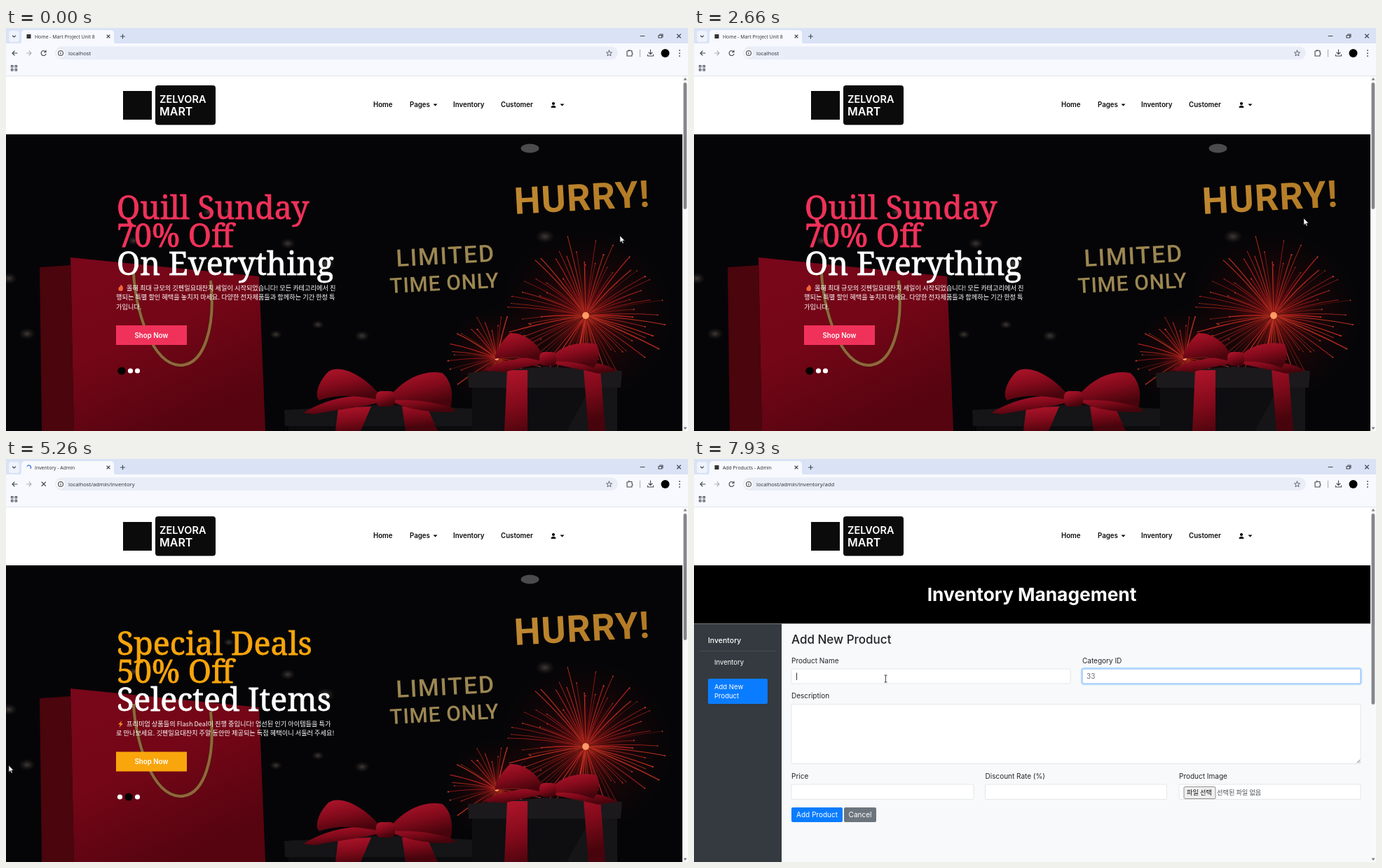
These frames come from a looping animation (973 by 576 pixels, 8 s). An HTML page:

```html
<!DOCTYPE html>
<html lang="en">
<head>
<meta charset="utf-8">
<title>Shop demo</title>
<style>
html,body{margin:0;width:100%;height:100%;overflow:hidden;background:#fff}
svg{display:block;width:100vw;height:100vh}
text{font-family:Inter,sans-serif;white-space:pre}
.ui{font:7.7px "Open Sans",sans-serif;fill:#2b2d33}
.nav{font-size:9.7px;font-weight:600;fill:#0b0b0b}
.head{font:500 44.8px "Noto Serif",serif;stroke-width:.8}
.ko{font:500 9.2px "Noto Sans CJK KR","Noto Sans CJK",sans-serif;fill:#fff}
.sign{font-family:Roboto,sans-serif;font-weight:700}
.thin{font-weight:500}
.label{font-size:10px;fill:#212529}
.side{font-size:9.5px;fill:#fff}
.line{fill:none;stroke:#43474e;stroke-width:1.1;stroke-linecap:round;stroke-linejoin:round}
.field{fill:#fff;stroke:#dde1e5;stroke-width:.8}
</style>
</head>
<body>
<svg viewBox="0 0 973 576" preserveAspectRatio="none">
<defs>
  <linearGradient id="bag" x2=".5" y2="1"><stop stop-color="#78071a"/><stop offset=".5" stop-color="#740617"/><stop offset="1" stop-color="#560410"/></linearGradient>
  <linearGradient id="silk" x2=".4" y2="1"><stop stop-color="#b3152c"/><stop offset=".55" stop-color="#820a1b"/><stop offset="1" stop-color="#48040c"/></linearGradient>
  <linearGradient id="gold" x2="1" y2=".3"><stop stop-color="#c18a33"/><stop offset="1" stop-color="#b27a25"/></linearGradient>
  <radialGradient id="glow"><stop stop-color="#ff5038" stop-opacity=".8"/><stop offset=".15" stop-color="#a81016" stop-opacity=".5"/><stop offset=".5" stop-color="#60080c" stop-opacity=".22"/><stop offset="1" stop-color="#400406" stop-opacity="0"/></radialGradient>
  <radialGradient id="blur"><stop stop-color="#75665a" stop-opacity=".55"/><stop offset="1" stop-color="#333" stop-opacity="0"/></radialGradient>
  <clipPath id="page"><path d="M0 152H965V576H0z"/></clipPath>
</defs>

<rect width="973" height="576" fill="#fff"/>

<g id="home" clip-path="url(#page)">
  <rect y="152" width="965" height="424" fill="#050507"/>
  <g id="lights"></g>
  <ellipse cx="747.5" cy="172" rx="13" ry="6.5" fill="#4b4b4d"/>
  <path d="M48 342L92 339 97 576H51z" fill="#4a050d"/>
  <path d="M92 328L361 355 370 576H97z" fill="url(#bag)"/>
  <g fill="none">
    <path d="M182 350C184 400 207 480 248 482 284 482 299 425 292 361" stroke="#3c1f10" stroke-width="5.5"/>
    <path d="M182 350C184 400 207 480 248 482 284 482 299 425 292 361" stroke="#94663c" stroke-width="4"/>
  </g>
  <g id="fireworks" fill="none" stroke-linecap="round"></g>

  <path d="M397 546L540 538 684 545 682 569 398 569z" fill="#151417"/>
  <path d="M403 569H678V576H403z" fill="#0b0b0d"/>
  <g fill="url(#silk)">
    <path d="M474 543L521 541 506 576H470zM565 541L600 540 616 576H570z"/>
    <path d="M532 528C500 522 462 527 424 550L440 552C475 545 510 542 533 535z"/>
    <path d="M551 527C590 517 622 528 642 548L620 549C594 548 570 543 552 535z"/>
    <path d="M535 526C510 496 478 480 460 491 444 507 440 527 447 532 475 522 506 526 535 532z"/>
    <path d="M548 526C567 502 596 488 622 493 638 504 638 532 634 542 602 532 576 531 549 532z"/>
    <rect x="528" y="519" width="27" height="22" rx="7"/>
  </g>

  <path d="M659 493L770 484 879 490 877 514 660 514z" fill="#1b191c"/>
  <path d="M665 514H872V576H665z" fill="#0e0d10"/>
  <path d="M800 576L834 514H872V576z" fill="#151417"/>
  <g fill="url(#silk)">
    <path d="M715 489H744V576H711zM824 487L848 487 855 576H831z"/>
    <path d="M765 470C735 469 700 478 681 489L710 492C735 485 755 482 768 479z"/>
    <path d="M779 470C810 474 850 476 873 490L845 494C822 488 795 484 778 479z"/>
    <path d="M766 469C758 448 737 435 719 436 707 447 698 464 697 473 722 468 745 470 766 477z"/>
    <path d="M780 468C795 453 820 447 843 452 849 466 844 480 838 486 818 477 799 476 780 477z"/>
    <rect x="761" y="463" width="24" height="20" rx="7"/>
  </g>
  <text class="sign" transform="translate(726 266)rotate(-3.2)" font-size="53" letter-spacing="1.4" fill="url(#gold)">HURRY!</text>
  <g fill="#9c8753">
    <text class="sign thin" transform="translate(557 341)rotate(-3)" font-size="34" letter-spacing="1.8">LIMITED</text>
    <text class="sign thin" transform="translate(548 379)rotate(-3)" font-size="30" letter-spacing=".7">TIME ONLY</text>
  </g>

  <g id="slide1">
    <g fill="#f0325a" stroke="#f0325a"><text class="head" x="158" y="273">Quill Sunday</text><text class="head" x="158" y="313">70% Off</text></g>
    <text class="head" x="158" y="352.5" fill="#fff" stroke="#fff">On Everything</text>
    <path d="M164 367C168 369 168 376 164 376 159 376 160 371 162 370z" fill="#f4633a"/>
    <text class="ko" x="172" y="374.5">올해 최대 규모의 깃펜일요대잔치 세일이 시작되었습니다! 모든 카테고리에서 진</text>
    <text class="ko" x="157" y="388">행되는 특별 할인 혜택을 놓치지 마세요. 다양한 전자제품들과 함께하는 기간 한정 특</text>
    <text class="ko" x="157" y="401.5">가입니다.</text>
    <rect x="157" y="425" width="101" height="28" fill="#f0325a"/>
    <text class="nav" x="207.5" y="442.5" text-anchor="middle" style="fill:#fff">Shop Now</text>
  </g>
  <g id="slide2">
    <g fill="#f9a50c" stroke="#f9a50c"><text class="head" x="158" y="273">Special Deals</text><text class="head" x="158" y="313">50% Off</text></g>
    <text class="head" x="158" y="352.5" fill="#fff" stroke="#fff">Selected Items</text>
    <path d="M165 367L160 372.500H163L161.500 377 167 371H164z" fill="#f5852a"/>
    <text class="ko" x="172" y="374.5">프리미엄 상품들의 Flash Deal이 진행 중입니다! 엄선된 인기 아이템들을 특가</text>
    <text class="ko" x="157" y="388">로 만나보세요. 깃펜일요대잔치 주말 동안만 제공되는 독점 혜택이니 서둘러 주세요!</text>
    <rect x="157" y="411.5" width="101" height="28" fill="#f9a50c"/>
    <text class="nav" x="207.5" y="429" text-anchor="middle" style="fill:#fff">Shop Now</text>
  </g>
  <g id="dots"><circle cy="490"/><circle cy="490"/><circle cy="490"/></g>
</g>

<g id="admin">
  <rect y="152" width="965" height="83.500" fill="#000"/>
  <text x="482" y="203" font-size="26.300" font-weight="700" fill="#fff" text-anchor="middle">Inventory Management</text>
  <rect y="235.500" width="965" height="341" fill="#f8f9fa"/>
  <rect y="235.500" width="125" height="341" fill="#343a40"/>
  <text x="20" y="262.500" font-size="10.500" font-weight="500" fill="#fff">Inventory</text>
  <path d="M8 274.500H117" stroke="#464c52"/>
  <rect id="active" x="20" width="85" rx="2" fill="#0a7cff"/>
  <text class="side" x="29" y="294">Inventory</text>
  <text class="side" x="29" y="328.500">Add New</text><text class="side" x="29" y="342">Product</text>
  <g id="form">
    <text x="139" y="264" font-size="17" font-weight="500" fill="#212529">Add New Product</text>
    <g id="fields"></g>
    <path d="M946 434L950 430M948.500 434L950 432.500" class="line" style="stroke-width:.7"/>
    <rect x="699" y="468.500" width="45" height="17" rx="1.500" fill="#efefef" stroke="#777" stroke-width=".8"/>
    <text class="ko" x="703" y="480" style="fill:#111">파일 선택</text>
    <text class="ko" x="746" y="480" style="fill:#495057;font-weight:400">선택된 파일 없음</text>
    <rect x="139" y="498" width="73" height="21" rx="2" fill="#0a7cff"/>
    <text class="label" x="175.500" y="511.500" text-anchor="middle" style="fill:#fff">Add Product</text>
    <rect x="214" y="498" width="46" height="21" rx="2" fill="#6c757d"/>
    <text class="label" x="237" y="511.500" text-anchor="middle" style="fill:#fff">Cancel</text>
    <g id="ring" fill="none"><rect x="553" y="299" width="399" height="23" rx="3" stroke="#bfdeff" stroke-width="2.400"/><rect x="554" y="300" width="397" height="21" rx="2" stroke="#80bdff" stroke-width=".8"/></g>
    <text id="category" class="label" x="560" y="314" style="fill:#6a7076"></text>
    <path id="caret" stroke="#222" stroke-width=".9"/>
  </g>
</g>

<g id="siteHeader">
  <rect x="167" y="90" width="41" height="41" fill="#0b0b0c"/>
  <rect x="213" y="82" width="86" height="56.500" rx="4" fill="#0b0b0c"/>
  <g fill="#fff" font-size="16" font-weight="600"><text x="219" y="107" font-size="14.500">ZELVORA</text><text x="219" y="124.500">MART</text></g>
  <text class="nav" x="524" y="113">Home</text><text class="nav" x="576" y="113">Pages</text>
  <text class="nav" x="638" y="113">Inventory</text><text class="nav" x="706" y="113">Customer</text>
  <path d="M609.500 108.500H615.500L612.500 111.500zM790.500 108.500H796.500L793.500 111.500zM777.500 114C777.500 109.500 784.500 109.500 784.500 114z"/>
  <circle cx="781" cy="108" r="2.100"/>
</g>

<rect width="973" height="23" fill="#dae2f6"/>
<rect y="22" width="973" height="46" fill="#f7f9fe"/>
<path d="M0 68.500H973" stroke="#dfe3ec"/>
<rect x="4" y="4" width="15" height="16" rx="4" fill="#edf2fc"/>
<path d="M18 23Q22 23 22 18V8Q22 3 27 3H149Q154 3 154 8V18Q154 23 158 23z" fill="#f7f9fe"/>
<path class="line" d="M9.500 11L11.500 13 13.500 11M144 10L148 14M148 10L144 14M166.500 9V15M163.500 12H169.500M905 11.500H911M957.500 9L962.500 14M962.500 9L957.500 14M931 10.500H935.500V14H931zM932.500 9H937V13M16 36H9.500M12 33L9 36 12 39M886 33H888Q888 30.500 890 32.500H893V35.500Q895 36 893 38V40H886zM919.500 31V37M917 35L919.500 37.500 922 35M915.500 38V40H923.500V38"/>
<path class="line" style="stroke:#aab0bb" d="M29.500 36H36M33 33L36 36 33 39M904.500 31V41"/>
<path id="reload" class="line" d="M56.500 34A3.500 3.500 0 1 0 57 37M57 32V34.500H54.500"/>
<path id="stop" class="line" d="M51 33L56.500 38.500M56.500 33L51 38.500"/>
<rect x="70" y="26.500" width="803" height="18.500" rx="9.250" fill="#e9edf7"/>
<circle cx="78" cy="36" r="6" fill="#fff"/>
<circle class="line" cx="78" cy="36" r="3.500"/><path class="line" d="M78 35.500V37.500M78 34V34"/>
<path class="line" style="stroke-width:.8" d="M860.500 32L861.700 34.800 864.500 35 862.300 36.800 863 39.700 860.500 38.200 858 39.700 858.700 36.800 856.500 35 859.300 34.800z"/>
<circle cx="940.500" cy="36" r="6" fill="#000"/>
<path d="M961 32V32M961 36V36M961 40V40" stroke="#43474e" stroke-width="1.800" stroke-linecap="round"/>
<path class="line" d="M7.500 53.500H10V56H7.500zM13 53.500H15.500V56H13zM7.500 58.500H10V61H7.500zM13 58.500H15.500V61H13z"/>
<rect id="favicon" x="29.500" y="9" width="6" height="6" fill="#333"/>
<path id="spinner" class="line" d="M32.500 9A3 3 0 0 1 32.500 15" style="stroke:#3568d4"/>
<text id="title" class="ui" x="41" y="15" style="font-size:6.900px"></text>
<text id="url" class="ui" x="89" y="38.500"></text>

<rect x="965" y="69" width="8" height="507" fill="#fafafb"/>
<path d="M966.500 74.500L969 71 971.500 74.500zM966.500 570.500L969 574 971.500 570.500z" fill="#77797d"/>
<rect id="thumb" x="966.500" y="78" width="4.800" rx="2.400" fill="#858689"/>

<g id="pointer" stroke-linejoin="round">
  <path id="arrow" d="M0 0V9.500L2.200 7.500 3.700 11 5.200 10.400 3.700 7H6.700z" fill="#fff" stroke="#222" stroke-width=".6"/>
  <path id="hand" d="M0 0Q1.500 -1 1.700 1V4L6 5V8L5 11H0L-3 7Q-3 5 -1 7V1Z" fill="#fff" stroke="#222" stroke-width=".7"/>
  <path id="beam" d="M-2-5H2M0-5V5M-2 5H2" fill="none" stroke="#333" stroke-width=".9"/>
</g>
</svg>
<script>
const $ = id => document.getElementById(id);
const show = (id, on) => $(id).style.display = on ? '' : 'none';
const move = (id, x, y) => $(id).setAttribute('transform', `translate(${x} ${y})`);
const LOOP = 8000, SLIDE_START = 3026, SLIDE_TIME = 600, PAGE_WIDTH = 965;
const OPEN_INVENTORY = 4730, PAINT_INVENTORY = 5330, PAINT_FORM = 5980;

let seed = 7;
const random = () => (seed = seed * 16807 % 2147483647) / 2147483647;

function burst(cx, cy, reach, count) {
  let out = `<circle cx="${cx}" cy="${cy}" r="${reach}" fill="url(#glow)"/>`;
  for (let i = 0; i < count; i++) {
    const a = (i + random()) / count * 2 * Math.PI, r = reach * (.5 + .5 * random());
    const x = cx + Math.cos(a) * r, y = cy + Math.sin(a) * r * .95;
    const mx = cx + Math.cos(a) * r * .55, my = cy + Math.sin(a) * r * .55 - r * .04;
    out += `<path d="M${cx} ${cy}Q${mx} ${my} ${x} ${y}" stroke="hsl(${random() * 8},72%,${22 + random() * 24}%)" stroke-width="${.5 + random() * .9}"/>
      <circle cx="${x}" cy="${y}" r="${.5 + random() * .7}" fill="#b8382c"/>`;
  }
  return out + `<circle cx="${cx}" cy="${cy}" r="${reach * .04}" fill="#ff9a66"/>`;
}
$('fireworks').innerHTML = burst(700, 472, 72, 42) + burst(827, 411, 123, 75);

$('lights').innerHTML = [[289, 263, 9], [318, 262, 8], [456, 337, 14], [402, 308, 11], [445, 424, 9],
  [508, 440, 11], [769, 298, 14], [182, 304, 9], [4, 358, 12], [385, 438, 9], [30, 437, 12]]
  .map(([x, y, r]) => `<ellipse cx="${x}" cy="${y}" rx="${r}" ry="${r * .7}" fill="url(#blur)"/>`).join('');

$('fields').innerHTML = [['Product Name', 139, 300, 398, 21], ['Category ID', 554, 300, 397, 21],
  ['Description', 139, 350.5, 812, 85], ['Price', 139, 465, 260, 21.5],
  ['Discount Rate (%)', 415.5, 465, 259, 21.5], ['Product Image', 692, 465, 259, 21.5]]
  .map(([name, x, y, w, h]) => `<text class="label" x="${x}" y="${y - 8.5}">${name}</text>
    <rect class="field" x="${x}" y="${y}" width="${w}" height="${h}" rx="2"/>`).join('');

const path = [[0, 876, 297], [860, 883, 291], [1460, 883, 291], [1930, 870, 272], [2960, 870, 272],
  [3260, 766, 151], [3780, 785, 96], [3930, 785, 96], [4330, 662, 110], [4660, 662, 110], [5260, 4, 438],
  [5400, 4, 438], [5700, 62, 332], [5950, 62, 332], [6260, 270, 323], [6530, 270, 323], [6860, 690, 313],
  [7720, 690, 313], [7900, 273.5, 314], [8000, 273.5, 314]];

const clamp = v => Math.min(1, Math.max(0, v));
const smooth = v => v * v * (3 - 2 * v);
const between = (t, a, b) => t >= a && t < b;

function pointerAt(t) {
  const i = path.findIndex(p => p[0] > t);
  const [t0, x0, y0] = path[i - 1], [t1, x1, y1] = path[i];
  const k = smooth((t - t0) / (t1 - t0));
  return [x0 + (x1 - x0) * k, y0 + (y1 - y0) * k];
}

function drawCarousel(t) {
  const p = smooth(clamp((t - SLIDE_START) / SLIDE_TIME)), started = t >= SLIDE_START;
  const drop = p === 1 ? 7 : 0; // the shorter slide is re-centred once it settles
  show('slide1', p < 1);
  show('slide2', started);
  move('slide1', -PAGE_WIDTH * p, 0);
  move('slide2', PAGE_WIDTH * (1 - p), drop);
  move('dots', 0, -drop);
  const active = started ? 1 : 0, xs = started ? [162.5, 175, 187.5] : [165, 177.5, 187.5];
  [...$('dots').children].forEach((dot, i) => {
    dot.setAttribute('cx', xs[i]);
    dot.setAttribute('r', i === active ? 5.6 : 3.6);
    dot.setAttribute('fill', i === active ? '#000' : '#fff');
  });
}

function drawBrowser(t) {
  const form = t >= PAINT_FORM, opened = t >= OPEN_INVENTORY;
  const loading = between(t, OPEN_INVENTORY, 5400) || between(t, 5860, PAINT_FORM);
  $('title').textContent = form ? 'Add Products - Admin' : opened ? 'Inventory - Admin' : 'Home - Mart Project Unit 8';
  $('url').textContent = 'localhost' + (form ? '/admin/inventory/add' : opened ? '/admin/inventory' : '');
  show('reload', !loading);
  show('stop', loading);
  show('favicon', !loading);
  show('spinner', loading);
  $('spinner').setAttribute('transform', `rotate(${t * .4} 32.5 12)`);
  $('thumb').setAttribute('height', t < PAINT_INVENTORY ? 181 : 273);
}

function drawAdmin(t) {
  const form = t >= PAINT_FORM;
  show('home', t < PAINT_INVENTORY);
  show('admin', t >= PAINT_INVENTORY);
  show('form', form);
  $('active').setAttribute('y', form ? 314 : 280);
  $('active').setAttribute('height', form ? 36 : 22);
  $('ring').style.opacity = clamp((t - 6800) / 150);
  $('category').textContent = '3'.repeat((t >= 7260) + (t >= 7330));
  show('caret', t >= 6860);
  const x = t >= 7900 ? 146.5 : t >= 7330 ? 573 : t >= 7260 ? 567 : 560.5;
  $('caret').setAttribute('d', `M${x} 305.5V316`);
}

function drawPointer(t) {
  const hand = between(t, 4280, 4720) || between(t, 5650, 5985), beam = t >= 6600;
  move('pointer', ...pointerAt(t));
  show('pointer', !between(t, 7260, 7720));
  show('hand', hand);
  show('beam', beam);
  show('arrow', !hand && !beam);
}

function frame(now) {
  const t = now % LOOP;
  drawCarousel(t);
  drawBrowser(t);
  drawAdmin(t);
  drawPointer(t);
  requestAnimationFrame(frame);
}
frame(performance.now());
</script>
</body>
</html>
```
